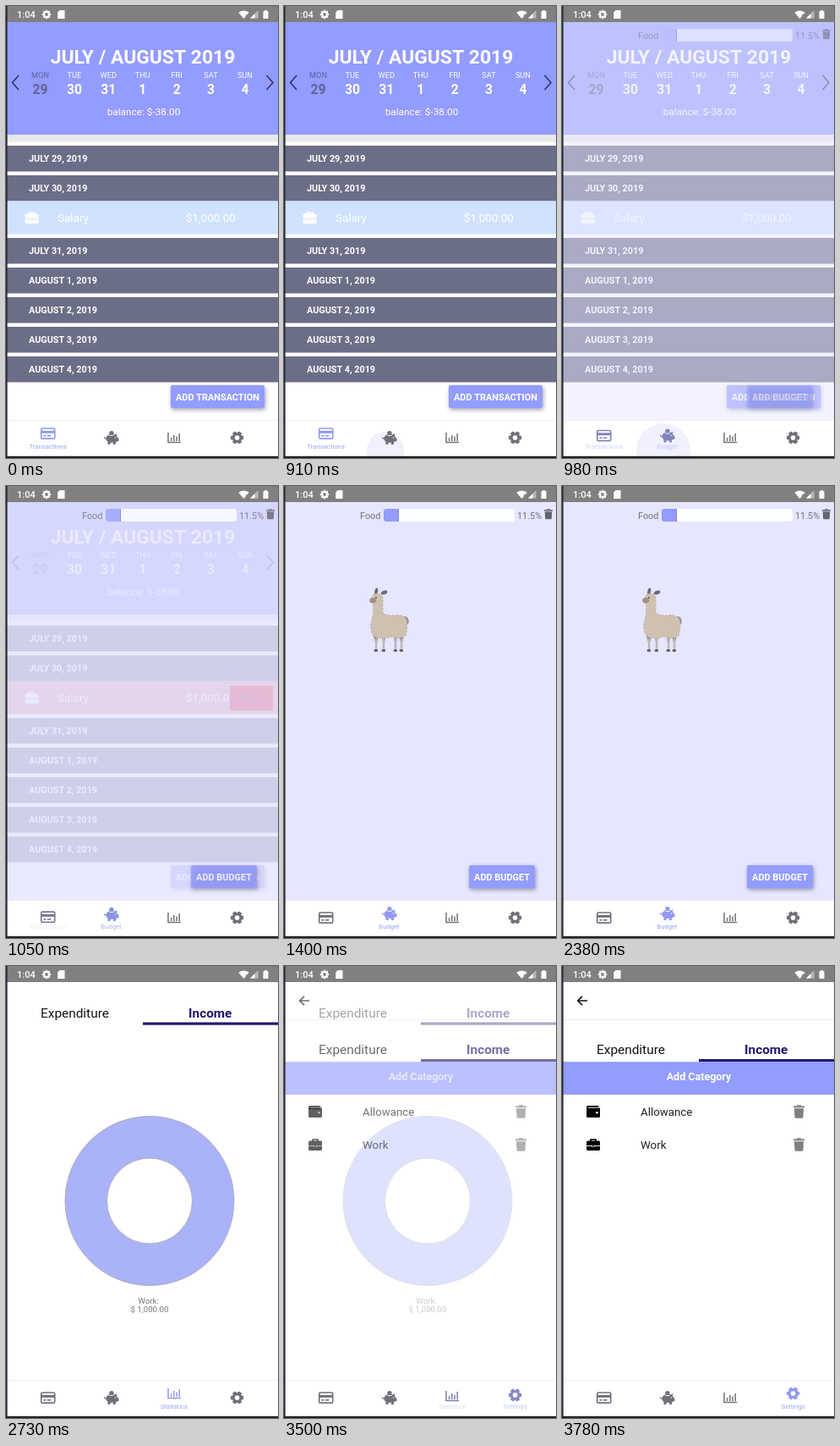
Animation, 322 px wide and 534 px high, one loop 4340 ms. Source, as an HTML page with a canvas:

```html
<!DOCTYPE html>
<html lang="en">
<head>
<meta charset="utf-8">
<title>Budget app</title>
<style>
  html, body { margin: 0; width: 100%; height: 100%; overflow: hidden; background: #fff; }
  canvas { display: block; width: 322px; height: 534px; }
</style>
</head>
<body>
<canvas id="stage"></canvas>
<script>
const W = 322, H = 534, LOOP = 4340, STEP = 70;
const BLUE = '#939cff', SLATE = '#6b6e87', NAVY = '#21176f', LAVENDER = '#e6e6ff';
const canvas = document.getElementById('stage');
const c = canvas.getContext('2d');
const dpr = window.devicePixelRatio || 1;
canvas.width = W * dpr;
canvas.height = H * dpr;

const clamp = v => Math.max(0, Math.min(1, v));
const ease = (t, start, length) => 1 - Math.pow(1 - clamp((t - start) / length), 2.4);
const mix = (a, b, k) => `rgb(${a.map((v, i) => Math.round(v + (b[i] - v) * k))})`;

function rect(x, y, w, h, color) {
  c.fillStyle = color;
  c.fillRect(x, y, w, h);
}

function round(x, y, w, h, r, color) {
  c.fillStyle = color;
  c.beginPath();
  c.roundRect(x, y, w, h, r);
  c.fill();
}

function oval(x, y, rx, ry, color, turn = 0) {
  c.fillStyle = color;
  c.beginPath();
  c.ellipse(x, y, rx, ry, turn, 0, Math.PI * 2);
  c.fill();
}

function stroke(d, color, width) {
  c.strokeStyle = color;
  c.lineWidth = width;
  c.stroke(new Path2D(d));
}

function fill(d, color) {
  c.fillStyle = color;
  c.fill(new Path2D(d));
}

function text(s, x, y, size, color, weight = 400, align = 'left') {
  c.font = `${weight} ${size}px Roboto, sans-serif`;
  c.textAlign = align;
  c.fillStyle = color;
  c.fillText(s, x, y);
}

function at(x, y, draw, scale = 1) {
  c.save();
  c.translate(x, y);
  c.scale(scale, scale);
  draw();
  c.restore();
}

// Icons, each drawn around its own centre

function gear(color, r, teeth) {
  c.fillStyle = color;
  c.beginPath();
  for (let i = 0; i < teeth; i++) {
    for (const [k, d] of [[0.74, -0.5], [1, -0.27], [1, 0.27], [0.74, 0.5]]) {
      const a = (i + d * 0.9) / teeth * Math.PI * 2;
      c.lineTo(Math.cos(a) * r * k, Math.sin(a) * r * k);
    }
  }
  c.closePath();
  c.moveTo(r * 0.36, 0);
  c.arc(0, 0, r * 0.36, 0, Math.PI * 2);
  c.fill('evenodd');
}

function card(color) {
  c.strokeStyle = color;
  c.lineWidth = 1.7;
  c.beginPath();
  c.roundRect(-8, -6, 16, 12.2, 1.5);
  c.stroke();
  rect(-8, -3.2, 16, 3, color);
  rect(-5.4, 2, 3, 1.6, color);
  rect(-1, 2, 4.6, 1.6, color);
}

function piggy(color) {
  oval(0.4, -5.4, 2.7, 2.7, color);
  oval(0.4, 1, 6.6, 5, color);
  fill('M3 -3 L7 -5 L6.4 -2 Q7.6 -.8 8 .4 L9 .6 V4 L7 4.6 L4 6 Z', color);
  rect(-4, 3, 3, 5, color);
  rect(2.4, 3, 3, 5, color);
  stroke('M-5.6 1 Q-8.4 1.6 -8 -.8', color, 1.2);
  rect(-2, -2.9, 4.8, 0.9, '#fff');
  oval(5, 0, 0.7, 0.7, '#fff');
}

function bars(color) {
  stroke('M-7 -6 V5.5 H8 M-3.4 4 V0 M-.2 4 V-3 M3 4 V-1.4 M6.2 4 V-5', color, 1.5);
}

function briefcase(color, gap) {
  stroke('M-3 -4 V-6 H3 V-4', color, 1.6);
  round(-8, -4.4, 16, 11.4, 1.6, color);
  rect(-8, 1, 16, 0.9, gap);
  rect(-1.6, 0.6, 3.2, 2.4, gap);
  rect(-1, 0.4, 2, 2, color);
}

function wallet(color) {
  round(-8, -7, 14.5, 4, 1.6, color);
  round(-8, -5, 16, 12, 1.6, color);
  rect(-6, -4.8, 13, 0.8, '#fff');
  oval(4.4, 1.2, 1.3, 1.3, '#fff');
}

function trash(color) {
  rect(-6.6, -6.6, 13.2, 1.9, color);
  rect(-2.4, -7.8, 4.8, 1.6, color);
  fill('M-5.6 -3.8 H5.6 L5 6.2 Q4.9 7.8 3.6 7.8 H-3.6 Q-4.9 7.8 -5 6.2 Z', color);
}

function llama() {
  const legs = [8, 17, 31, 38];
  legs.forEach((x, i) => {
    fill(`M${x - 3.4} 55 H${x + 3.2} L${x + 1.4} 64 H${x - 1.2} Z`, i % 3 ? '#b8aba1' : '#968a84');
    rect(x - 1.2, 60, 2.5, 14, '#bdb6b4');
    round(x - 2.4, 73, 4.4, 2.8, 1, '#5d5b66');
  });
  oval(43, 39, 3.6, 5.2, '#92919a', -0.3);
  oval(8.2, 4.6, 1.9, 4.2, '#6a6975', 0.2);
  oval(17.6, 5.8, 3.9, 2.2, '#6a6975', -0.3);
  const body = 'M2 14 Q4 7 10 7 Q16 7 16 13 L16 30 Q20 33 28 33 Q40 31 44 38' +
    ' Q46 48 43 57 Q36 61 27 58 Q12 62 5 57 Q0 50 2.5 40 Q5.5 30 4.5 20 Z';
  fill(body, '#cfc1b1');
  c.setLineDash([2.5, 2]);
  stroke(body, '#c3b5a6', 1.1);
  c.setLineDash([]);
  oval(4.2, 15.2, 4, 3.2, '#a58f80', -0.2);
  oval(8, 12, 1, 1, '#4f4a50');
}

function button(x, w, label) {
  c.save();
  c.shadowColor = 'rgba(40,40,80,.45)';
  c.shadowBlur = 5 * dpr;
  c.shadowOffsetX = dpr;
  c.shadowOffsetY = 2 * dpr;
  round(x, 448, w, 27, 2, BLUE);
  c.restore();
  text(label, x + w / 2, 465.6, 10.9, '#fff', 700, 'center');
}

// Pages

function transactions(t) {
  rect(0, 19, W, 471, '#fff');
  rect(0, 152, W, 8.5, '#e8e8ea');
  rect(0, 19, W, 133, BLUE);
  text('JULY / AUGUST 2019', 162, 68, 22.9, '#fff', 700, 'center');
  ['MON', 'TUE', 'WED', 'THU', 'FRI', 'SAT', 'SUN'].forEach((day, i) => {
    const x = 40.5 + i * 40.4, color = i ? '#fff' : '#5f6498';
    text(day, x, 85, 9.2, color, 400, 'center');
    text(i < 3 ? 29 + i : i - 2, x, 104, 15.6, color, 700, 'center');
  });
  stroke('M15 82 L7.5 90.5 L15 99 M308.5 82 L316 90.5 L308.5 99', '#2d3060', 1.5);
  text('balance: $-38.00', 163, 129, 11.8, '#fff', 400, 'center');

  const dates = ['JULY 29', 'JULY 30', 'JULY 31', 'AUGUST 1', 'AUGUST 2', 'AUGUST 3', 'AUGUST 4'];
  dates.forEach((date, i) => {
    const y = 165 + i * 35 + (i > 1 ? 39 : 0);
    rect(0, y, W, 30.5, SLATE);
    text(date + ', 2019', 27, y + 19.4, 10.8, '#fff', 700);
  });

  const swiped = t >= 1050;
  const row = swiped ? '#e1929b' : '#d0e2ff';
  rect(0, 230.5, W, 39, row);
  at(30.5, 250, () => briefcase('#fff', row));
  text('Salary', 61, 255, 13.4, '#fff');
  text('$1,000.00', 213, 255, 13.4, '#fff');
  if (swiped) {
    rect(265, 236, 51, 29, '#eb002d');
    text('DELETE', 290.5, 254, 10.5, '#8a1040', 400, 'center');
  }
  button(195, 111, 'ADD TRANSACTION');
}

function budget(t) {
  rect(0, 19, W, 471, LAVENDER);
  text('Food', 90, 39, 10.9, '#74747e');
  round(118, 27, 155, 15, 3, '#fff');
  round(118, 27, 18, 15, [3, 0, 0, 3], BLUE);
  rect(135, 27, 1, 15, '#8086c0');
  text('11.5%', 276, 39, 10.9, '#74747e');
  at(313, 33.2, () => trash('#65656e'), 0.77);
  if (t >= 1120) at(101 - 6 * (t - 1400) / 980, 120, llama);
  button(219, 78, 'ADD BUDGET');
}

function tabs(y, gap) {
  text('Expenditure', 41, y, 15.4, '#111');
  text('Income', 241.7, y, 15.3, NAVY, 700, 'center');
  rect(162, y + gap, 160, 3.2, NAVY);
}

function statistics() {
  rect(0, 19, W, 471, '#fff');
  tabs(60.5, 6);
  c.beginPath();
  c.arc(170, 277.5, 100, 0, Math.PI * 2);
  c.moveTo(220.5, 277.5);
  c.arc(170, 277.5, 50.5, 0, Math.PI * 2);
  c.fillStyle = '#aab2fa';
  c.fill('evenodd');
  c.strokeStyle = '#a9a9b8';
  c.lineWidth = 0.9;
  c.stroke();
  text('Work:', 168.5, 398.6, 9.7, '#777', 400, 'center');
  text('$ 1,000.00', 170, 408.6, 9.7, '#777', 400, 'center');
}

function settings() {
  rect(0, 19, W, 471, '#fff');
  stroke('M30 41 H19 M24 35.8 L18.6 41 L24 46.2', '#111', 1.6);
  rect(0, 63, W, 1, '#ececec');
  tabs(104, 6);
  rect(0, 113.2, W, 38.8, BLUE);
  text('Add Category', 162, 135, 12.5, '#fff', 700, 'center');
  ['Allowance', 'Work'].forEach((name, i) => {
    const y = 172 + i * 39;
    at(37, y, () => i ? briefcase('#000', '#fff') : wallet('#000'));
    text(name, 93, y + 5, 13.3, '#222');
    at(280.5, y, () => trash('#808080'));
  });
}

const pages = [
  { draw: transactions, label: 'Transactions', icon: card, x: 49.7, start: -1000, length: 1 },
  { draw: budget, label: 'Budget', icon: piggy, x: 124.5, start: 910, length: 280 },
  { draw: statistics, label: 'Statistics', icon: bars, x: 199, start: 2380, length: 100 },
  { draw: settings, label: 'Settings', icon: color => gear(color, 7.8, 6), x: 273.6, start: 3430, length: 210 }
];

function statusBar() {
  rect(0, 0, W, 19, '#808080');
  text('1:04', 13, 14, 11, '#fff', 500);
  at(48, 10, () => gear('#fff', 5.3, 8));
  fill('M63.5 5 H69.5 V15 H61.2 V7.4 Z', '#fff');
  fill('M281.5 15 L275.3 7.8 Q281.5 3 287.7 7.8 Z', '#fff');
  stroke('M284 10 L287.6 14 M287.6 10 L284 14', '#808080', 1.2);
  fill('M298.5 5 V14.5 H289 Z', '#b9b9b9');
  fill('M294.5 9 V14.5 H289 Z', '#fff');
  round(304.5, 6, 6, 9, 0.8, '#fff');
  rect(306, 5, 3, 1.5, '#fff');
}

function tabBar(t, now, shown) {
  rect(0, 489.5, W, 44.5, '#fff');
  rect(0, 489, W, 0.8, '#ebebef');
  if (t >= 840 && t < 1050) {
    c.save();
    c.beginPath();
    c.rect(87, 490, 75, 41.5);
    c.clip();
    oval(120, 525, 22 + (t - 910) / 7, 22 + (t - 910) / 7, '#f0f0fe');
    c.restore();
  }
  pages.forEach((p, i) => {
    const focus = i === now ? shown : i === now - 1 ? 1 - shown : 0;
    const color = mix([112, 112, 122], [145, 153, 244], focus);
    at(p.x, 510 - 5 * focus, () => p.icon(color));
    c.globalAlpha = focus;
    if (focus > 0) text(p.label, p.x, 523, 7.7, '#9ca3f5', 400, 'center');
    c.globalAlpha = 1;
  });
}

function draw(t) {
  c.setTransform(dpr, 0, 0, dpr, 0, 0);
  const now = pages.filter(p => t > p.start).length - 1;
  const shown = ease(t, pages[now].start, pages[now].length);
  if (shown < 1) pages[now - 1].draw(t);
  c.globalAlpha = shown;
  pages[now].draw(t);
  c.globalAlpha = 1;
  tabBar(t, now, shown);
  statusBar();
  rect(0, 0, 1.6, H, '#2a2a38');
  rect(0, 531.8, W, 2.2, '#222228');
}

function tick() {
  const t = performance.now() % LOOP;
  draw(Math.floor(t / STEP) * STEP);
  requestAnimationFrame(tick);
}
tick();
</script>
</body>
</html>
```
